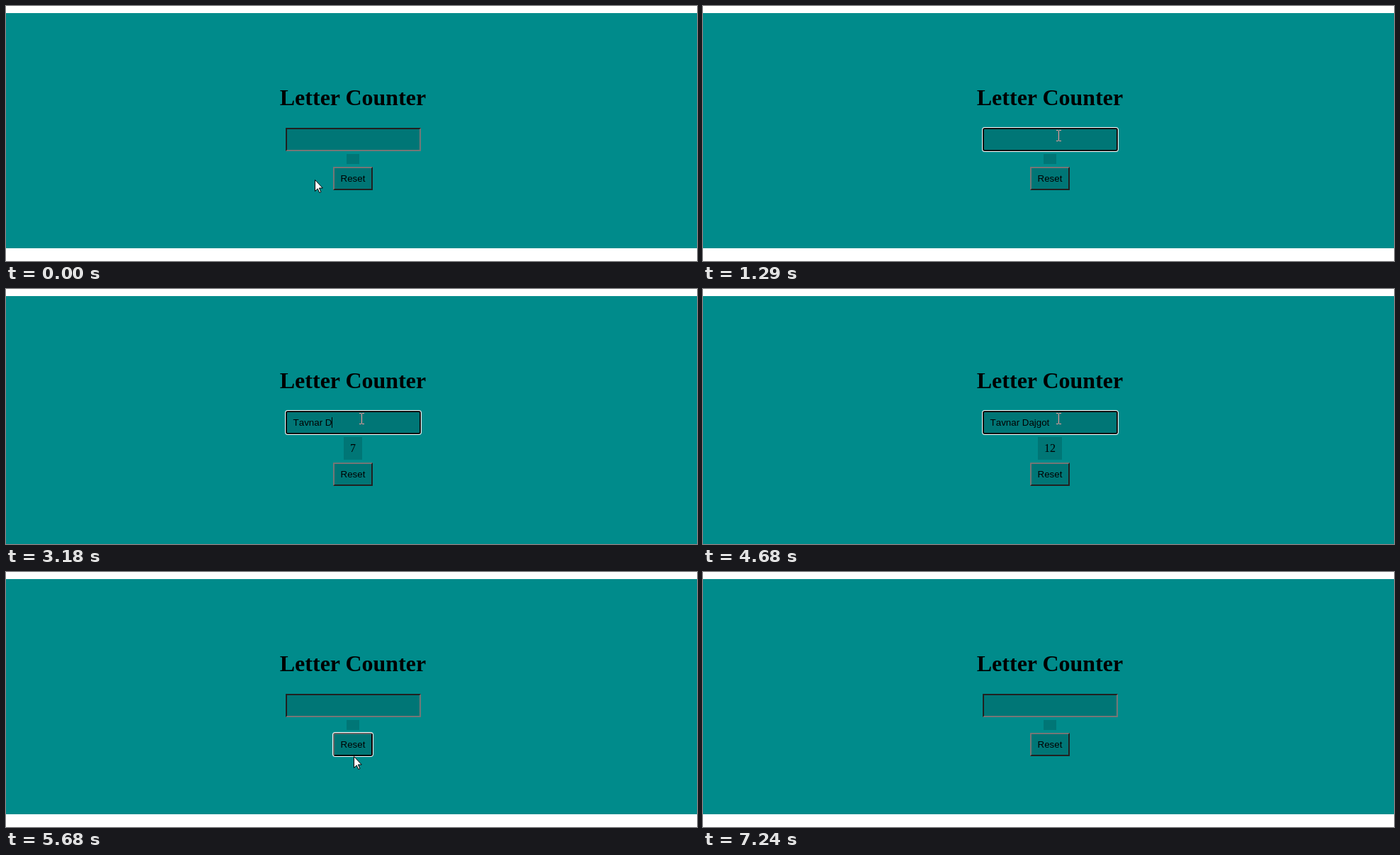
Recreate the animation shown at these times as an HTML page. Size 976 px wide and 360 px high, loop 7.34 s.

```html
<!DOCTYPE html>
<html lang="en">
<head>
<meta charset="utf-8">
<title>Letter Counter</title>
<style>
  html, body { margin: 0; width: 100%; height: 100%; overflow: hidden; background: #fff; }
  #stage { position: relative; width: 976px; height: 360px; overflow: hidden; color: #000; }
  #stage > * { position: absolute; box-sizing: border-box; margin: 0; }
  #page { left: 0; top: 10px; width: 976px; background: #008b8b; }
  h1 { left: 0; top: 111px; width: 980px; text-align: center;
       font: bold 32px/36px "Liberation Serif", "Times New Roman", serif; }
  .control { height: 33px; background: #007676; border: 2px inset #767676; white-space: pre;
             font: 13.3333px/29px "Liberation Sans", Arial, sans-serif; font-kerning: none; }
  #field { left: 395px; top: 172px; width: 191px; padding-left: 8.6px; }
  #reset { left: 462px; width: 56px; border-style: outset; text-align: center; }
  .control.focus { border: 2px solid #101010; border-radius: 3px; box-shadow: 0 0 0 1px #fff; }
  #caret { top: 181px; width: 1px; height: 15px; background: #000; }
  #count { top: 209px; background: #007676; text-align: center; padding-top: 7px;
           font: 16px/18px "Liberation Serif", "Times New Roman", serif; }
  #overlay { left: 0; top: 0; }
</style>
</head>
<body>
<div id="stage">
  <div id="page"></div>
  <h1>Letter Counter</h1>
  <div id="field" class="control"><span id="typed"></span></div>
  <div id="caret"></div>
  <div id="count"></div>
  <div id="reset" class="control">Reset</div>
  <svg id="overlay" width="976" height="360">
    <path id="arrow" d="M.5 .5V16.5L4.2 12.9L6.8 18.5L8.9 17.5L6.4 12H11.3Z" fill="#fff" stroke="#000"/>
    <path id="beam" d="M-4-7.5H-1M0-7.5H3M-.5-7V7M-4 7.5H-1M0 7.5H3" fill="none" stroke="#ff9c9c"/>
    <circle id="click" r="12" fill="#ff0"/>
  </svg>
</div>
<script>
const LOOP = 7340;
const NAME = "Tavnar Dajgot";
const KEY_TIMES = [1700, 2080, 2230, 2310, 2460, 2630, 2800, 3180, 3510, 3580, 3730, 3980, 4130];
const RESET_AT = 5680;

// Each row: start time, then the value held until the next row.
const POINTER = [
  [0, "arrow", 436, 245], [70, "arrow", 439, 240], [140, "arrow", 449, 225],
  [210, "beam", 466, 204], [290, "beam", 490, 188], [360, "beam", 503, 183],
  [4910, "beam", 503, 190], [4980, "beam", 503, 205], [5060, "arrow", 502, 236],
  [5130, "arrow", 495, 254], [5210, "arrow", 491, 260],
  [6010, "arrow", 523, 253], [6080, "arrow", 630, 255], [6160, "arrow", 743, 273],
  [6240, "arrow", 812, 297], [6310, "arrow", 838, 318], [6390, "arrow", 845, 337],
  [6460, "arrow", 845, 351], [6540, "none", 0, 0]
];
const CLICK = [[0, 0], [590, .5], [670, .25], [750, 0], [5610, .5], [5680, 0]];
const FOCUS = [[0, ""], [590, "field"], [5610, "reset"], [7240, ""]];
const CARET = [[0, 0], [590, 1], [1290, 0], [1700, 1], [4680, 0], [5210, 1], [5610, 0]];

const el = id => document.getElementById(id);
const at = (table, t) => table.findLast(row => row[0] <= t).slice(1);
const show = (node, on) => { node.style.visibility = on ? "visible" : "hidden"; };

function drawCount(length) {
  const text = length ? String(length - 1) : "";
  const width = 18 + 8 * text.length;
  const node = el("count");
  node.textContent = text;
  node.style.left = 490 - width / 2 + "px";
  node.style.width = width + "px";
  node.style.height = (length ? 32 : 14) + "px";
  el("reset").style.top = (length ? 245 : 227) + "px";
  el("page").style.height = (length ? 350 : 332) + "px";
}

function drawPointer(t) {
  const [kind, x, y] = at(POINTER, t);
  for (const id of ["arrow", "beam"]) {
    show(el(id), id === kind);
    el(id).setAttribute("transform", `translate(${x} ${y})`);
  }
  el("click").setAttribute("transform", `translate(${x} ${y})`);
  el("click").setAttribute("opacity", at(CLICK, t)[0]);
}

function render(t) {
  const length = t < RESET_AT ? KEY_TIMES.filter(time => time <= t).length : 0;
  el("typed").textContent = NAME.slice(0, length);
  drawCount(length);

  const [focused] = at(FOCUS, t);
  for (const id of ["field", "reset"]) el(id).classList.toggle("focus", id === focused);

  el("caret").style.left = Math.round(405.6 + el("typed").getBoundingClientRect().width) + "px";
  show(el("caret"), at(CARET, t)[0]);
  drawPointer(t);
}

function tick() {
  render(performance.now() % LOOP);
  requestAnimationFrame(tick);
}
tick();
</script>
</body>
</html>
```
